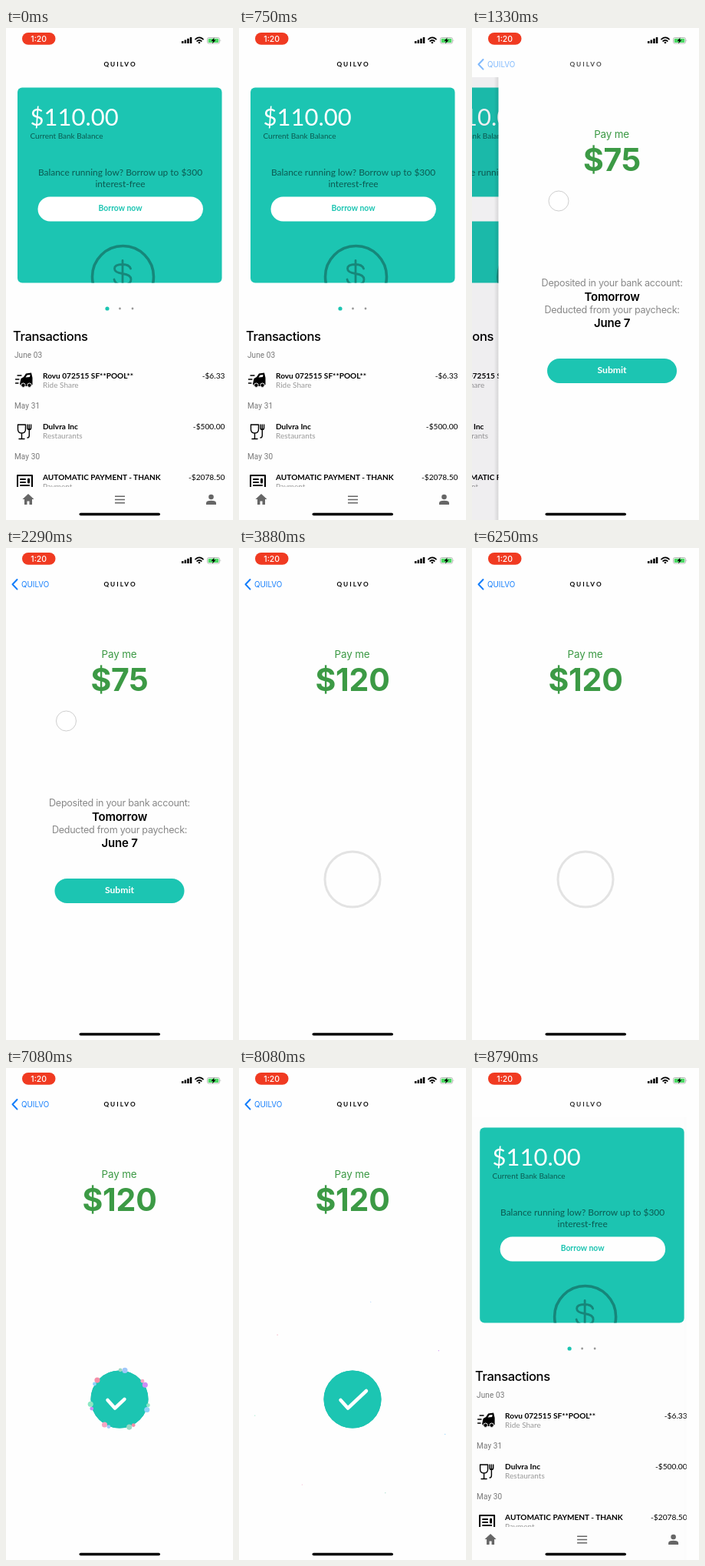
An HTML page that plays this animation: 296 by 640 pixels, repeating every 8.83 s.

```html
<!DOCTYPE html>
<html lang="en">
<head>
<meta charset="utf-8">
<title>Pay advance</title>
<style>
  html, body { margin: 0; width: 100%; height: 100%; overflow: hidden; background: #fefefe; }
  svg { display: block; width: 296px; height: 640px; }
  text { white-space: pre; }
  .lato { font-family: Lato, sans-serif; }
  .inter { font-family: Inter, sans-serif; }
  .roboto { font-family: Roboto, sans-serif; }
  .bold { font-weight: 700; }
  .mid { text-anchor: middle; }
  .end { text-anchor: end; }
  .line { fill: none; stroke-linecap: round; stroke-linejoin: round; }
</style>
</head>
<body>
<svg viewBox="0 0 296 640" xmlns="http://www.w3.org/2000/svg">
  <defs>
    <clipPath id="cardClip"><rect x="15" y="77.500" width="266.500" height="254" rx="6"/></clipPath>
    <linearGradient id="edge"><stop offset="0" stop-color="#000" stop-opacity="0"/><stop offset="1" stop-color="#000" stop-opacity=".12"/></linearGradient>
  </defs>
  <rect width="296" height="640" fill="#fefefe"/>

  <g id="home">
    <g clip-path="url(#cardClip)">
      <rect x="15" y="77" width="267" height="255" fill="#1cc5b2"/>
      <g class="line" stroke="#16877a">
        <circle cx="152.500" cy="323.500" r="40" stroke-width="3.600"/>
        <path stroke-width="2.800" d="M152 302.500V342M162.500 313Q160.500 307.500 152 307.500Q141.500 307.500 141.500 313Q141.500 318 152 319.500Q163 321 163 327Q163 334 152 334Q142.500 334 141 327"/>
      </g>
    </g>
    <g class="lato">
      <text x="31.500" y="127" font-size="31" fill="#fff">$110.00</text>
      <text x="31.500" y="143.700" font-size="10" fill="#0b5a51">Current Bank Balance</text>
      <g class="mid" font-size="11.950" fill="#0b5a51">
        <text x="149" y="192">Balance running low? Borrow up to $300</text>
        <text x="149" y="206.700">interest-free</text>
      </g>
      <rect x="41.500" y="219.500" width="215.500" height="32" rx="16" fill="#fff"/>
      <text class="bold mid" x="149" y="238.200" font-size="10.400" fill="#1cc5b2">Borrow now</text>
    </g>
    <circle cx="132" cy="365" r="2.600" fill="#1cc5b2"/>
    <circle cx="148.500" cy="365" r="1.400" fill="#999"/>
    <circle cx="165" cy="365" r="1.400" fill="#999"/>
    <text class="inter" x="9" y="406.500" font-size="16.600" font-weight="500" letter-spacing="-.4">Transactions</text>
    <g id="rows"></g>

    <g>
      <path d="M18 463L19.500 456L23 454L26 449.500L33 448.500L34.500 455V464L31 466H20Z"/>
      <path fill="#fefefe" d="M25.500 454.500L27.500 451.500L31.500 451L31 454Z"/>
      <circle cx="22.500" cy="464.700" r="2.700" stroke="#fefefe"/>
      <circle cx="30.500" cy="464.700" r="2.700" stroke="#fefefe"/>
      <path class="line" stroke="#000" stroke-width="1.300" d="M15 452H20M12.500 457H17M12.500 462H16"/>
    </g>
    <g class="line" stroke="#000" stroke-width="1.400">
      <path d="M15.500 516H25.500V522Q25.500 527 20.500 527Q15.500 527 15.500 522ZM20.500 527V534M17 534.500H24"/>
      <path d="M28 516V520Q28 522.500 30.300 522.500Q32.600 522.500 32.600 520V516M30.300 516V530Q30.300 533 28 533"/>
    </g>
    <g class="line" stroke="#000" stroke-width="2">
      <path d="M15 582H34V598H15ZM19 587H25M19 591H25M19 595H30"/>
      <path stroke-width="3" d="M29.500 587V591"/>
    </g>

    <rect y="597" width="296" height="43" fill="#fefefe"/>
    <g fill="#666">
      <path d="M29 606L21.500 613H24V620H27.500V615.500H30.500V620H34V613H36.500Z"/>
      <path d="M142 608.500H155V610H142ZM142 612.700H155V614.200H142ZM142 617H155V618.500H142Z"/>
      <circle cx="267.500" cy="610" r="3.300"/>
      <path d="M261 620V618Q261 614.800 267.500 614.800Q274 614.800 274 618V620Z"/>
    </g>
  </g>
  <rect id="shade" y="64" width="296" height="576" fill="#100828"/>

  <g id="page">
    <rect id="shadow" x="-6" y="64" width="6" height="576" fill="url(#edge)"/>
    <rect y="64" width="296" height="576" fill="#fefefe"/>
    <g class="inter mid">
      <g fill="#3c9a45">
        <text x="147.500" y="142.700" font-size="13.400" letter-spacing="-.15">Pay me</text>
        <text id="sum" class="bold" x="148" y="186" font-size="41" letter-spacing="-.2"></text>
      </g>
      <g id="form">
        <circle id="thumb" cy="225" r="13" fill="#fff" stroke="#c9c9c9" stroke-width=".9"/>
        <g font-size="12.600" letter-spacing="-.28" fill="#888">
          <text x="148" y="336">Deposited in your bank account:</text>
          <text x="148" y="370.500">Deducted from your paycheck:</text>
        </g>
        <g font-size="15" font-weight="600" letter-spacing="-.2">
          <text x="148" y="354.500">Tomorrow</text>
          <text x="148" y="388.500">June 7</text>
        </g>
      </g>
    </g>
    <rect id="button"/>
    <text id="label" class="lato bold mid" x="148" y="449" font-size="12.200" fill="#fff">Submit</text>
    <circle id="arc" class="line" cx="148" cy="431" r="36" stroke="#1cc5b2" stroke-width="3" pathLength="100" transform="rotate(-90 148 431)"/>
    <g id="done">
      <circle cx="148" cy="431" r="37.500" fill="#1cc5b2"/>
      <path id="tick" class="line" d="M132.500 432L142 442.500L166 420" stroke="#fff" stroke-width="4.500" pathLength="100"/>
    </g>
    <g id="burst"></g>
  </g>

  <rect width="296" height="64" fill="#fefefe"/>
  <text id="title" class="lato bold mid" x="149" y="50.200" font-size="8.300" letter-spacing="2">QUILVO</text>
  <g id="back">
    <path class="line" d="M14.500 41L8.500 47.300L14.500 53.600" stroke="#147efb" stroke-width="2"/>
    <text class="inter" x="20" y="50.800" font-size="9.800" fill="#147efb">QUILVO</text>
  </g>

  <rect x="21" y="6" width="43.500" height="15.800" rx="7.900" fill="#f03a21"/>
  <text class="inter mid" x="42.700" y="17.600" font-size="10.500" font-weight="500" fill="#fff">1:20</text>
  <path d="M229 17H231.500V20H229ZM232.600 15.500H235.100V20H232.600ZM236.200 13.700H238.700V20H236.200ZM239.800 12H242.300V20H239.800Z"/>
  <g class="line" stroke="#000" stroke-width="1.700">
    <path d="M247 14.600Q252 10.200 257 14.600M249.200 17Q252 14.700 254.800 17"/>
    <circle cx="252" cy="19" r=".5"/>
  </g>
  <rect x="262.500" y="12.500" width="16" height="7.600" rx="2" fill="none" stroke="#aaa" stroke-width=".8"/>
  <rect x="263.700" y="13.700" width="13.600" height="5.200" rx="1" fill="#4cd964"/>
  <path d="M279.600 15V17.600Q281 16.300 279.600 15Z" fill="#aaa"/>
  <path d="M271.500 12.500L267.500 17H270L269 20.500L273.500 15.500H271Z"/>
  <rect x="95.500" y="630.700" width="105.500" height="3.500" rx="1.750"/>
</svg>

<script>
const LOOP = 8830, SLIDE = 500;
const PUSH = 1147, DRAG = 2400, TAP = 3180, FILL = 6460, DONE = 6960, BURST = 7080, POP = 8556;
const TEAL = [28, 197, 178], GREY = [227, 227, 227], WHITE = [254, 254, 254];
const $ = id => document.getElementById(id);
const clamp = x => Math.min(1, Math.max(0, x));
const mix = (a, b, k) => a + (b - a) * k;
const blend = (a, b, k) => `rgb(${a.map((v, i) => Math.round(mix(v, b[i], k)))})`;
const span = (t, start, length) => clamp((t - start) / length);
const smooth = k => k * k * (3 - 2 * k);
const easeOut = k => 1 - (1 - k) ** 3;
const set = (el, attrs) => { for (const key in attrs) el.setAttribute(key, attrs[key]); };

// Screen slide easing: cubic-bezier(.2833, .99, .3183, .99)
function glide(x) {
  const curve = (s, a, b) => 3 * (1 - s) ** 2 * s * a + 3 * (1 - s) * s * s * b + s ** 3;
  let lo = 0, hi = 1;
  for (let i = 0; i < 24; i++) {
    const s = (lo + hi) / 2;
    if (curve(s, .2833, .3183) < x) lo = s; else hi = s;
  }
  return curve(lo, .99, .99);
}

$('rows').innerHTML = [
  ['June 03', 'Rovu 072515 SF**POOL**', 'Ride Share', '-$6.33'],
  ['May 31', 'Dulvra Inc', 'Restaurants', '-$500.00'],
  ['May 30', 'AUTOMATIC PAYMENT - THANK', 'Payment', '-$2078.50']
].map(([day, name, kind, amount], i) => `<g class="lato" transform="translate(0 ${i * 66})">
  <text class="roboto" x="11" y="429" font-size="10" letter-spacing=".1" fill="#777">${day}</text>
  <text class="bold" x="48" y="456" font-size="10.100">${name}</text>
  <text x="48" y="467.700" font-size="10" fill="#999">${kind}</text>
  <text class="end" x="285.500" y="456" font-size="10.200">${amount}</text></g>`).join('');

const HUES = ['#9fc7fa', '#cc8ef5', '#91d2fa', '#9cd8c3', '#f5a6c4', '#8ce8c3', '#f48ea7'];
$('burst').innerHTML = HUES.map((hue, i) =>
  `<circle fill="${hue}"/><circle fill="${HUES[(i + 3) % 7]}"/>`).join('');
const dots = [...$('burst').children];

function drawButton(t) {
  const k = smooth(span(t, TAP, 380));
  const w = mix(169, 72, k), h = mix(32, 72, k), y = mix(446, 431, k);
  const fade = span(t, TAP + 80, 260);
  set($('button'), {
    x: 148 - w / 2, y: y - h / 2, width: w, height: h, rx: h / 2,
    fill: blend(TEAL, WHITE, fade), stroke: blend(TEAL, GREY, fade), 'stroke-width': 3 * k
  });
  set($('label'), { opacity: 1 - span(t, TAP, 120) });
  set($('form'), { opacity: 1 - span(t, TAP, 150) });
}

function drawSuccess(t) {
  const fill = smooth(span(t, FILL, DONE - FILL));
  set($('arc'), { opacity: fill > 0 ? 1 : 0, 'stroke-dasharray': `${fill * 100} 200` });
  set($('done'), { opacity: span(t, DONE, 120) });
  set($('tick'), { 'stroke-dasharray': `${easeOut(span(t, DONE + 60, 200)) * 100} 200`, opacity: t > DONE + 60 ? 1 : 0 });

  const p = span(t, BURST, 1080), live = p > 0 && p < 1;
  dots.forEach((dot, i) => {
    const inner = i % 2;
    const angle = (10.6 + 50 * (i >> 1) - inner * 9) * Math.PI / 180;
    const r = mix(38, inner ? 112 : 129, easeOut(p));
    const size = inner ? 2.4 * (1 - p / .8) : 3.2 * (1 - p) + .35;
    set(dot, {
      cx: 148 + r * Math.sin(angle), cy: 431 - r * Math.cos(angle),
      r: live ? Math.max(0, size) : 0
    });
  });
}

function draw(t) {
  const p = t < POP ? glide(span(t, PUSH, SLIDE)) : 1 - glide(span(t, POP, SLIDE));
  set($('home'), { transform: `translate(${-88.8 * p} 0)` });
  set($('shade'), { opacity: .07 * p });
  set($('shadow'), { opacity: p });
  set($('page'), { transform: `translate(${296 * (1 - p)} 0)`, visibility: p > 0 ? 'visible' : 'hidden' });
  set($('back'), { opacity: clamp((p - .75) / .25) });
  set($('title'), { opacity: 1 - .8 * Math.sin(Math.PI * p) });

  const value = mix(75, 120, smooth(span(t, DRAG, 600)));
  $('sum').textContent = '$' + Math.round(value / 5) * 5;
  set($('thumb'), { cx: 8 + value * .94 });
  drawButton(t);
  drawSuccess(t);
}

const start = performance.now();
function tick() {
  draw((performance.now() - start) % LOOP);
  requestAnimationFrame(tick);
}
tick();
</script>
</body>
</html>
```
